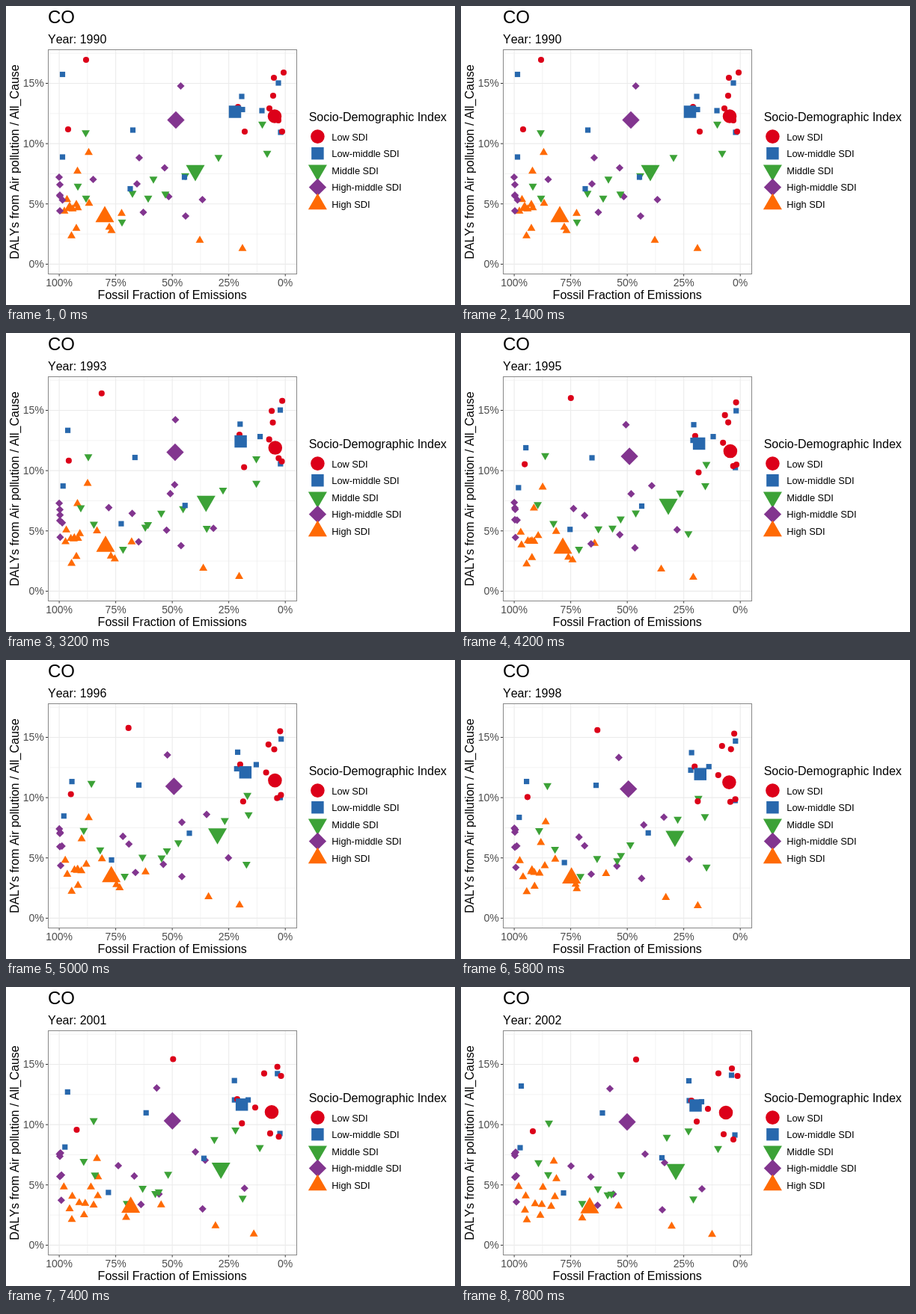
An HTML page that plays this animation: 600x400 px, repeating every 8000 ms.

```html
<!DOCTYPE html>
<html lang="en">
<head>
<meta charset="utf-8">
<title>CO by year</title>
<style>
  html, body { margin: 0; width: 100%; height: 100%; overflow: hidden; background: #fff; }
  svg { display: block; width: 600px; height: 400px; }
  text { font: 16px "Liberation Sans", Arial, sans-serif; font-kerning: none; }
  .tick { font-size: 14px; fill: #4d4d4d; }
  .label { font-size: 12.8px; }
  .middle { text-anchor: middle; }
  .end { text-anchor: end; }
</style>
</head>
<body>
<svg viewBox="0 0 600 400">
  <g id="axes"></g>
  <rect x="56.5" y="58.5" width="332" height="300" fill="none" stroke="#888"/>
  <text x="56" y="23" style="font-size:24px">CO</text>
  <text x="56" y="50" id="year"></text>
  <text x="222.2" y="391.7" class="middle">Fossil Fraction of Emissions</text>
  <text transform="translate(17 208.5) rotate(-90)" class="middle">DALYs from Air pollution / All_Cause</text>
  <text x="404.7" y="154">Socio-Demographic Index</text>
  <g id="legend"></g>
  <g id="dots"></g>
  <g id="summaries"></g>
</svg>
<script>
const STEP = 200, FRAMES = 40, PAUSE = 10, YEARS_PER_STEP = 29 / 69;
const SMALL = 4.05, LARGE = 9.3;
const $ = id => document.getElementById(id);

function make(parent, tag, attrs, text = "") {
  const el = document.createElementNS("http://www.w3.org/2000/svg", tag);
  for (const name in attrs) el.setAttribute(name, attrs[name]);
  el.textContent = text;
  parent.append(el);
  return el;
}
const place = (el, x, y) => el.setAttribute("transform", `translate(${x} ${y})`);

// Grid, ticks and tick labels
const xOf = percent => 373.2 - percent * 3.021;
const yOf = percent => 345.4 - percent * 16.127;
function line(x1, y1, x2, y2, stroke, width) {
  make($("axes"), "line", { x1, y1, x2, y2, stroke, "stroke-width": width });
}
const gridX = (p, width) => line(xOf(p), 58.5, xOf(p), 358.5, "#ebebeb", width);
const gridY = (p, width) => line(56, yOf(p), 388.5, yOf(p), "#ebebeb", width);
for (let p = 12.5; p < 100; p += 25) gridX(p, .6);
for (let p = 2.5; p < 20; p += 5) gridY(p, .6);
for (let p = 0; p <= 100; p += 25) {
  gridX(p, 1.1);
  line(xOf(p), 358.5, xOf(p), 361.5, "#333", 1);
  make($("axes"), "text", { x: xOf(p), y: 375.2, class: "tick middle" }, p + "%");
}
for (let p = 0; p <= 15; p += 5) {
  gridY(p, 1.1);
  line(53, yOf(p), 56, yOf(p), "#333", 1);
  make($("axes"), "text", { x: 50.8, y: yOf(p) + 5, class: "tick end" }, p + "%");
}

// Every marker covers about the area of a circle of radius r
function polygon(sides, radius, turn) {
  const corner = i => {
    const angle = turn + i * 2 * Math.PI / sides;
    return `${radius * Math.cos(angle)} ${radius * Math.sin(angle)}`;
  };
  return `M${Array.from({ length: sides }, (_, i) => corner(i)).join("L")}z`;
}
const shapes = {
  circle: r => `M${-r} 0a${r} ${r} 0 1 0 ${2 * r} 0a${r} ${r} 0 1 0 ${-2 * r} 0z`,
  square: r => polygon(4, 1.2533 * r, Math.PI / 4),
  diamond: r => polygon(4, 1.2533 * r, 0),
  up: r => polygon(3, 1.5547 * r, -Math.PI / 2),
  down: r => polygon(3, 1.5547 * r, Math.PI / 2)
};

// A drift is: start x, y, end x, y, then how far the path bows out in x and y.
// The last drift of a group belongs to its large summary marker.
const groups = [
  { label: "Low SDI", shape: "circle", fill: "#dc0019", drifts: [
    [107, 72, 234, 97, -9, 6], [83, 165, 96, 193, -3], [371, 89, 362, 109, 0, -4],
    [358, 96, 344, 115.5, 0, 7], [357, 120, 369.5, 119, -5], [310, 135, 308, 152, 4, -4],
    [352, 137, 330, 163, 7], [319, 168, 315, 180, 0, 15], [364, 153, 351, 197, 5, 9],
    [369, 168, 364, 204, 1, -6], [359, 147.5, 354, 168, 3, 3]] },
  { label: "Low-middle SDI", shape: "square", fill: "#2868ad", drifts: [
    [75.5, 91.5, 80.5, 132.5, 10, 50], [75.5, 202, 79, 215], [169.5, 166, 189, 168.5, -2],
    [166, 244.5, 137, 275.5, -10, 7], [238.5, 229, 268.5, 228.5, -9, 3], [315, 121, 304.5, 125.5],
    [316, 138.5, 305, 152, -2], [342, 140, 321.5, 153.5, 3, -7], [364, 103, 361.5, 118, 5, -5],
    [367, 169, 366, 198], [306, 141.5, 313.5, 158.5, 10]] },
  { label: "Middle SDI", shape: "down", fill: "#3ca237", drifts: [
    [106.5, 169.5, 117.5, 182, 2, -11], [96, 241, 103.5, 235, 4, -10], [107, 257, 116.5, 251, 14],
    [155, 289, 162, 289.5], [169, 250.5, 196, 278, 25], [190, 257, 183, 270, -4],
    [197, 231.5, 201, 277, 16], [213, 251.5, 310.5, 283.5, 58, 5], [239.5, 227, 214, 251, 4, 5],
    [284, 202.5, 275, 201, 13, 13], [342.5, 158, 304, 192.5, 0, 5], [349, 197, 343.5, 216, -22],
    [253, 220, 287, 244, 12]] },
  { label: "High-middle SDI", shape: "diamond", fill: "#82358f", drifts: [
    [71, 229, 71.5, 223], [72, 239, 72, 225.5], [72, 254, 73, 221, 0, -6],
    [72, 253, 72, 254.5, 0, -4], [75.5, 259.5, 74, 252.5, 0, -7], [72, 274, 74, 287.5, 0, -6],
    [116.5, 232, 147, 239.5, 24], [178, 203, 246, 223.5, 55, -7], [175, 238, 173.5, 254, -10],
    [212, 216.5, 272, 235, -8, -9], [183.5, 276, 182.5, 292, -10], [217.5, 255, 203.5, 277, 0, 7],
    [240, 281, 269, 298, -20], [262.5, 259, 322, 270, 4], [233.5, 107, 199, 136, 0, 5],
    [227, 152.5, 222, 180.5, 0, 2]] },
  { label: "High SDI", shape: "up", fill: "#ff6a04", drifts: [
    [110.5, 196, 124, 233, -7, -4], [95.5, 221, 127.5, 256.5, -11], [81.5, 259, 77, 267, 0, 5],
    [111, 264, 109.5, 268, 18], [94, 265.5, 125.5, 280.5, -3], [85, 268, 86.5, 279.5, 10, 6],
    [96, 270, 120.5, 293.5, -8], [78, 274.5, 85.5, 298.5], [83.5, 271, 99, 290],
    [89, 271.5, 108, 291, -4], [154.5, 277.5, 210.5, 293, 3, -2], [94, 297.5, 106, 305.5, -4],
    [87.5, 307.5, 88, 311.5], [138, 296, 172, 297, -8, 4], [141, 300.5, 162, 309],
    [259, 313.5, 281.5, 320], [316, 324.5, 335.5, 331, -14], [132, 282, 172, 295.5, -12, 1]] }
];

const markers = [];
groups.forEach(({ label, shape, fill, drifts }, row) => {
  const y = 174.6 + 22.6 * row;
  place(make($("legend"), "path", { d: shapes[shape](LARGE), fill }), 416.4, y);
  make($("legend"), "text", { x: 435.3, y: y + 5, class: "label" }, label);

  const layer = make($("dots"), "g", { fill });
  $("dots").prepend(layer);
  drifts.forEach((drift, i) => {
    const isSummary = i === drifts.length - 1;
    const d = shapes[shape](isSummary ? LARGE : SMALL);
    markers.push({ el: make(isSummary ? $("summaries") : layer, "path", { d, fill }), drift });
  });
});

function draw(now) {
  const step = Math.floor(now / STEP) % FRAMES;
  const moved = Math.max(0, step - PAUSE);
  const progress = moved / (FRAMES - 1 - PAUSE);
  const bow = Math.sin(Math.PI * progress);
  $("year").textContent = "Year: " + (1990 + Math.round(YEARS_PER_STEP * moved));
  for (const { el, drift: [x0, y0, x1, y1, bowX = 0, bowY = 0] } of markers) {
    place(el, x0 + (x1 - x0) * progress + bowX * bow, y0 + (y1 - y0) * progress + bowY * bow);
  }
  requestAnimationFrame(draw);
}
draw(performance.now());
</script>
</body>
</html>
```
